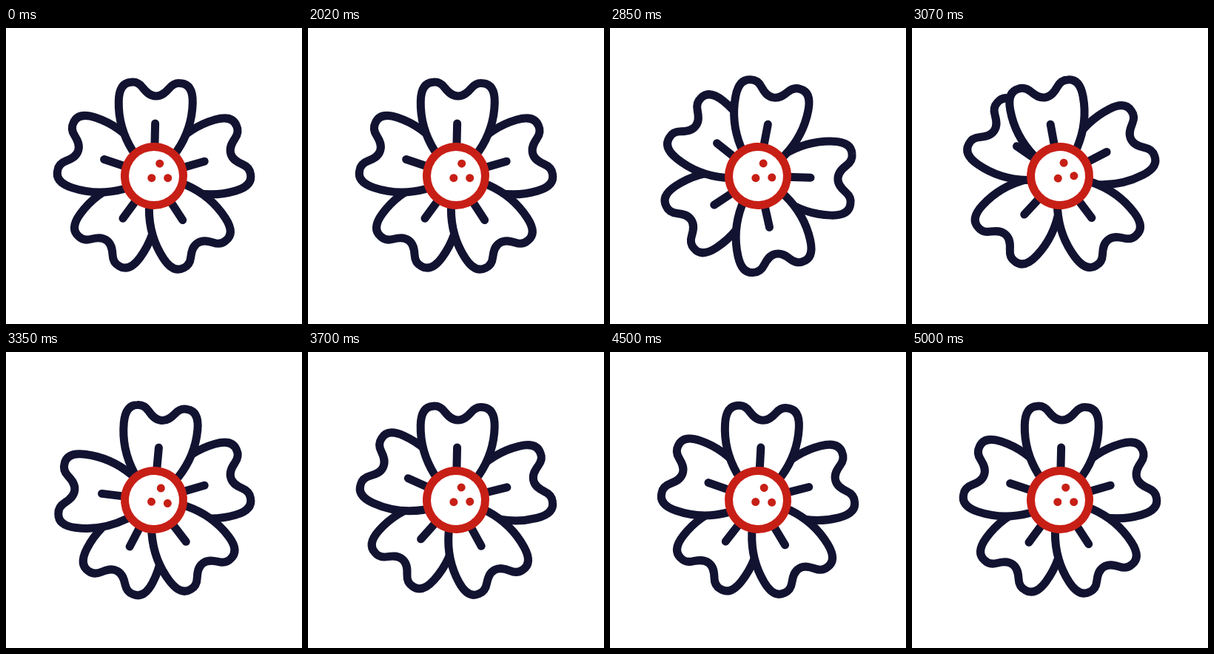
Recreate the animation shown at these times as an HTML page with a canvas. Size 400x400 px, loop 5020 ms.

```html
<!DOCTYPE html>
<html lang="en">
<head>
<meta charset="utf-8">
<title>Swaying flower</title>
<style>
html, body { margin: 0; width: 100%; height: 100%; overflow: hidden; background: #fff; }
canvas { display: block; width: 400px; height: 400px; }
</style>
</head>
<body>
<canvas id="stage"></canvas>
<script>
const LOOP = 5020, START = 2020, END = 5000;
const INK = '#121331', RED = '#c71f16', LINE = 11;
const LAG = 67;

const canvas = document.getElementById('stage');
const ctx = canvas.getContext('2d');
const scale = window.devicePixelRatio || 1;
canvas.width = canvas.height = 400 * scale;

// Keys are [time, degrees]; each stretch eases in and out.
function sway(keys, t) {
  if (t <= keys[0][0]) return keys[0][1];
  for (let i = 1; i < keys.length; i++) {
    const [t0, a] = keys[i - 1], [t1, b] = keys[i];
    if (t < t1) {
      const p = (t - t0) / (t1 - t0);
      return a + (b - a) * (1 - Math.cos(Math.PI * p)) / 2;
    }
  }
  return keys[keys.length - 1][1];
}

const heartKeys = [
  [START, 0], [2420, 19], [2650, 19], [2971, -11],
  [3385, 6], [3850, -4], [4320, 2], [END, 0]
];

// Every next petal follows the same swing a little later.
function petalKeys(k) {
  const late = [[2430, 20], [2730, 20.4], [3038, -12], [3440, 6], [3900, -4], [4370, 2]];
  return [[START + 30 * k, 0], ...late.map(([t, a]) => [t + LAG * k, a]), [END, 0]];
}

const petals = [1.3, 73.8, 147, 216.3, 288.4]
  .map((angle, k) => ({ angle, keys: petalKeys(k) }));
const order = [1, 3, 2, 4, 0];

const outline = new Path2D(`M0 0 L-30 -34 C-45 -57 -50 -80 -50 -100
  C-50 -116 -45 -125 -34 -126 C-28 -127 -22 -124 -18 -119
  C-13 -113 -8 -108 0 -108 C8 -108 13 -113 18 -119
  C22 -124 28 -127 34 -126 C45 -125 50 -116 50 -100
  C50 -80 45 -57 30 -34 Z`);
const stem = new Path2D('M0 -30 V-71');

function turned(deg, draw) {
  ctx.save();
  ctx.rotate(deg * Math.PI / 180);
  draw();
  ctx.restore();
}

function drawPetal() {
  ctx.fillStyle = '#fff';
  ctx.strokeStyle = INK;
  ctx.fill(outline);
  ctx.stroke(outline);
  ctx.stroke(stem);
}

function disc(x, y, r, color) {
  ctx.beginPath();
  ctx.arc(x, y, r, 0, Math.PI * 2);
  ctx.fillStyle = color;
  ctx.fill();
}

function drawHeart() {
  disc(0, 0, 45, RED);
  disc(0, 0, 34, '#fff');
  for (const [x, y] of [[7.7, -16.8], [-3.2, 2.7], [18.7, 2.7]]) disc(x, y, 5.5, RED);
}

function render(t) {
  ctx.setTransform(scale, 0, 0, scale, 0, 0);
  ctx.fillStyle = '#fff';
  ctx.fillRect(0, 0, 400, 400);
  ctx.translate(200, 200);
  ctx.lineWidth = LINE;
  ctx.lineCap = ctx.lineJoin = 'round';
  for (const k of order) {
    const { angle, keys } = petals[k];
    turned(angle + sway(keys, t), drawPetal);
  }
  turned(sway(heartKeys, t), drawHeart);
}

const begin = performance.now();
function tick() {
  render((performance.now() - begin) % LOOP);
  requestAnimationFrame(tick);
}
tick();
</script>
</body>
</html>
```
